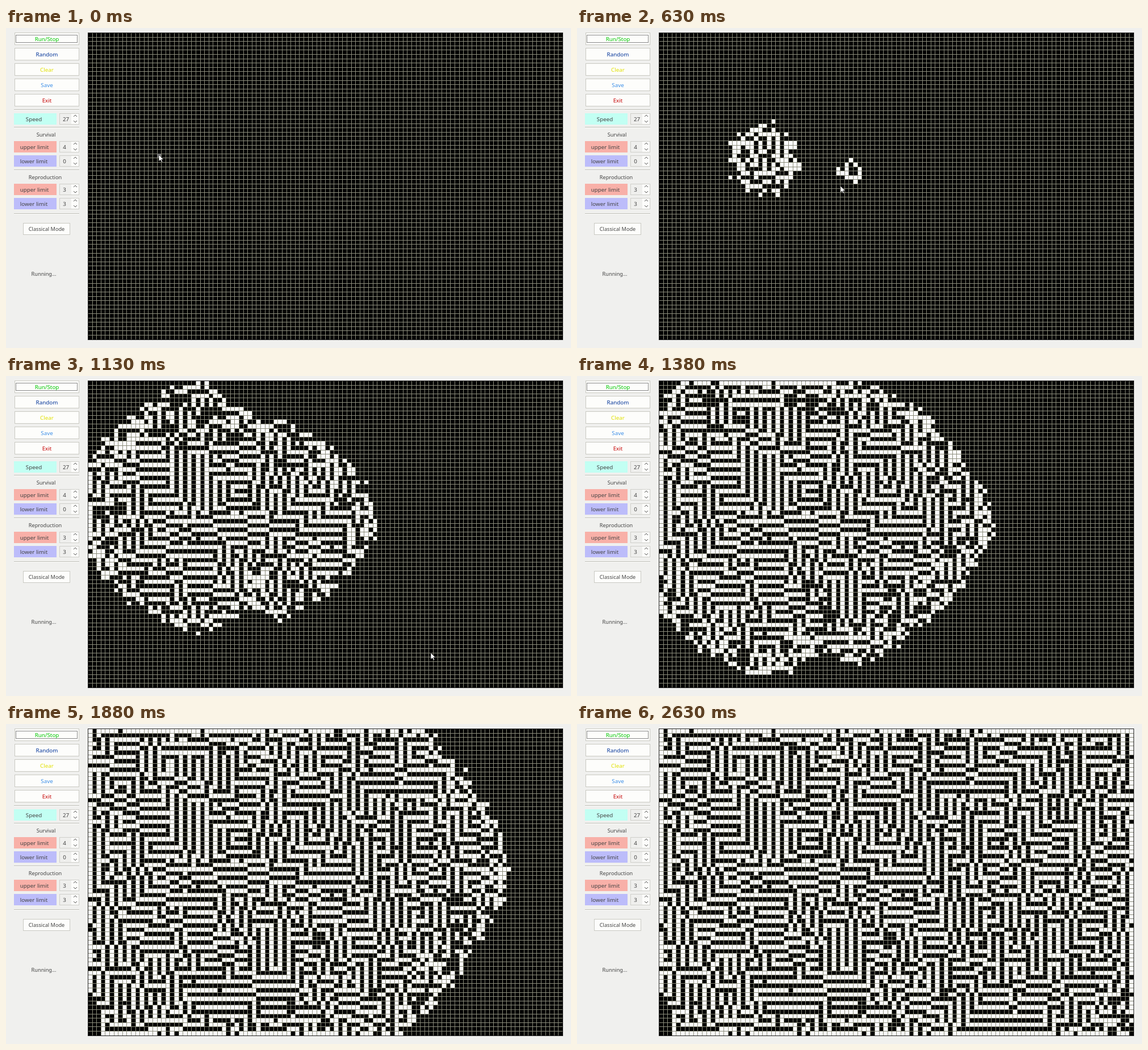
These frames come from a looping animation (995x563 px, 2.76 s). An HTML page with a canvas:

```html
<!DOCTYPE html>
<html lang="en">
<head>
<meta charset="utf-8">
<title>Cellular maze</title>
<style>
  html, body { margin: 0; width: 100%; height: 100%; overflow: hidden; background: #f0f0ee; }
  canvas, svg { position: absolute; left: 0; top: 0; }
  text { font: 9.2px "Noto Sans", sans-serif; fill: #444; text-anchor: middle; }
  .big { font-size: 9.8px; }
  .box { fill: #fdfdfb; stroke: #c9c9c2; }
  .line { fill: none; stroke: #555; }
  .focus { fill: none; stroke: #8a8a8a; }
</style>
</head>
<body>
<canvas id="board" width="995" height="563"></canvas>
<svg id="panel" width="995" height="563"></svg>
<script>
const COLS = 110, ROWS = 71, CELL = 7.6, LEFT = 144, TOP = 8;
const LOOP = 2760, STEP = 125, LAST = 21;
const FIRST = 3, GENS = 5; // growth starts after this step; generations per step

// ---- side panel ----
const label = (x, y, s, attr = '') => `<text x="${x}" y="${y + 3.5}" ${attr}>${s}</text>`;
const box = (x, y, w, h, attr = 'class="box"') =>
  `<rect x="${x + .5}" y="${y + .5}" width="${w}" height="${h}" ${attr}/>`;
const button = (y, s, color) => box(15, y - 11, 113, 21) +
  label(72, y, s, `class="big" style="fill:${color}"`);
const rule = y => `<path d="M14 ${y + .5}h115" stroke="#bdbdb6"/><path d="M14 ${y + 1.5}h115" stroke="#fff"/>`;
const spin = (y, s, x, color, value) =>
  `<rect x="14" y="${y - 10}" width="75" height="20" fill="${color}"/>` +
  label(x, y, s, 'class="big"') +
  box(94, y - 10, 34, 19, 'fill="#efefed" stroke="#cfcfca"') +
  `<rect x="115" y="${y - 9}" width="13" height="18" fill="#fdfdfb"/>` +
  label(value > 9 ? 105.5 : 103, y, value, 'class="big"') +
  `<path class="line" d="M119 ${y - 4}l3-3 3 3M119 ${y + 3}l3 3 3-3"/>`;
const RED = '#f8b0a8', BLUE = '#bcbcfa';
document.getElementById('panel').innerHTML =
  button(19, 'Run/Stop', '#00c800') + box(17, 12, 108, 13, 'class="focus"') +
  button(46, 'Random', '#003399') + button(73, 'Clear', '#e0e000') +
  button(100, 'Save', '#3d8fe8') + button(127, 'Exit', '#c40000') +
  rule(143) + spin(160, 'Speed', 49, '#c2fff3', 27) +
  rule(174) + label(70.5, 187, 'Survival') +
  spin(209, 'upper limit', 50, RED, 4) + spin(234, 'lower limit', 49, BLUE, 0) +
  rule(249) + label(69, 262, 'Reproduction') +
  spin(284, 'upper limit', 50, RED, 3) + spin(309, 'lower limit', 49, BLUE, 3) +
  rule(326) + box(30, 343, 82, 20) + label(71.5, 353, 'Classical Mode') +
  label(66.5, 432, 'Running...') +
  '<path id="cursor" d="M0 0V11.5L2.8 9 4.8 13 6.6 12.2 4.7 8.3H8.3Z" fill="#fff" stroke="#222" stroke-width=".7"/>';
const cursor = document.getElementById('cursor');

// ---- cellular automaton: born with 3 neighbours, survives with 0 to 4 ----
const W = COLS + 2; // one dead cell of padding on every side
const hash = (a, b) => {
  const v = Math.sin(a * 127.1 + b * 311.7) * 43758.5453;
  return v - Math.floor(v);
};
const norm = (x, y) => (Math.abs(x) ** 1.5 + Math.abs(y) ** 1.5) ** (1 / 1.5);

// Generation at which the front, spreading from two seeds, reaches a cell.
function arrival(c, r) {
  const outside = c < 0 || r < 0 || c >= COLS || r >= ROWS;
  const emptyCorner = c < 3 && r > 60 + c * 1.6;
  if (outside || emptyCorner) return Infinity;
  return Math.min(norm(c - 24, r - 29), norm(c - 44, r - 32) + 6) + hash(c, r) * 2;
}
const reach = Array.from({ length: W * (ROWS + 2) },
  (_, i) => arrival(i % W - 1, Math.floor(i / W) - 1));

const AROUND = [-W - 1, -W, -W + 1, -1, 1, W - 1, W, W + 1];
const evolve = (grid, gen) => grid.map((live, i) => {
  const age = gen - reach[i];
  if (age < 0) return 0;
  if (age < 1) return +(hash(i, 7) < .5);
  let n = 0;
  for (const d of AROUND) n += grid[i + d];
  return +(n === 3 || live && n < 5);
});

let grid = reach.map(() => 0);
const states = [];
for (let k = 0; k <= LAST; k++) {
  for (let g = 1; k > FIRST && g <= GENS; g++)
    grid = evolve(grid, (k - FIRST - 1) * GENS + g);
  states.push(grid);
}

// ---- drawing ----
const ctx = document.getElementById('board').getContext('2d');
const px = c => LEFT + Math.round(c * CELL), py = r => TOP + Math.round(r * CELL);
const fillCell = (c, r) =>
  ctx.fillRect(px(c), py(r), px(c + 1) - px(c), py(r + 1) - py(r));

// Pointer position keyed by step; linear, carried on past the last key.
const POINTER = [[0, 269, 223], [3, 282, 211], [7, 646, 345], [9, 748, 487]];
function pointerAt(k) {
  let i = 1;
  while (i < POINTER.length - 1 && k > POINTER[i][0]) i++;
  const [k0, x0, y0] = POINTER[i - 1], [k1, x1, y1] = POINTER[i];
  const f = (k - k0) / (k1 - k0);
  return [x0 + (x1 - x0) * f, y0 + (y1 - y0) * f];
}

function draw(k) {
  const w = px(COLS) - LEFT + 1, h = py(ROWS) - TOP + 1;
  ctx.fillStyle = '#000';
  ctx.fillRect(LEFT, TOP, w, h);
  ctx.fillStyle = '#fdfdfd';
  states[k].forEach((live, i) => live && fillCell(i % W - 1, Math.floor(i / W) - 1));
  ctx.fillStyle = '#8c8d7c';
  for (let c = 1; c < COLS; c++) ctx.fillRect(px(c), TOP, 1, h);
  for (let r = 1; r < ROWS; r++) ctx.fillRect(LEFT, py(r), w, 1);
  ctx.strokeStyle = '#222';
  ctx.strokeRect(LEFT + .5, TOP + .5, w - 1, h - 1);
  if (!k) {
    ctx.fillStyle = '#777';
    fillCell(16, 28);
  }
  cursor.setAttribute('transform', `translate(${pointerAt(k)})`);
}

let shown = -1;
const start = performance.now();
function tick() {
  const t = (performance.now() - start) % LOOP;
  const k = Math.min(LAST, Math.floor(Math.floor(t / 10) * 10 / STEP));
  if (k !== shown) draw(shown = k);
  requestAnimationFrame(tick);
}
tick();
</script>
</body>
</html>
```
